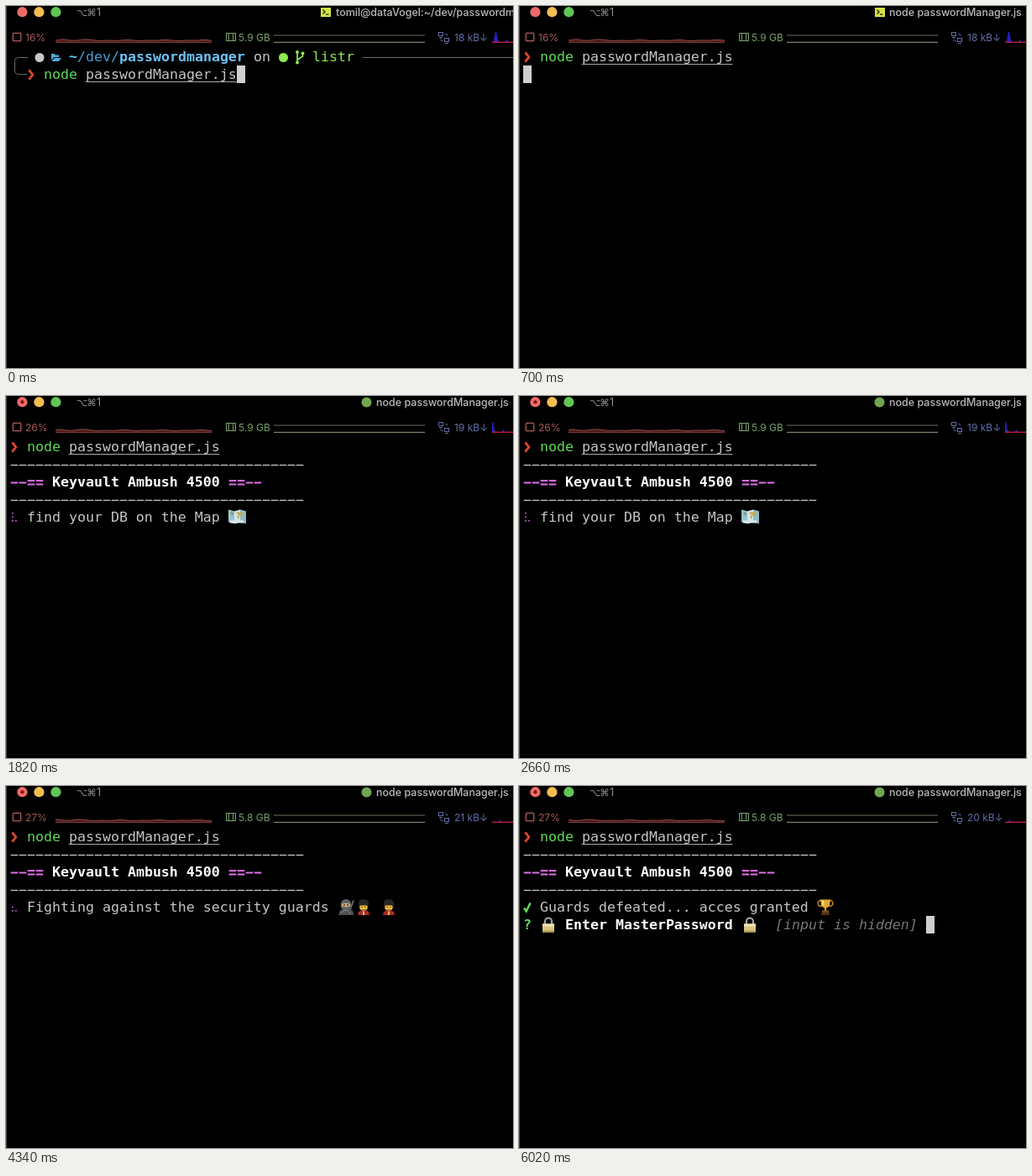
These frames come from a looping animation (604 by 432 pixels, 6370 ms). An HTML page with a canvas:

```html
<!DOCTYPE html>
<html lang="en">
<head>
<meta charset="utf-8">
<title>Terminal session</title>
<style>
  html, body { margin: 0; width: 100%; height: 100%; overflow: hidden; background: #000; }
  canvas { display: block; width: 604px; height: 432px; }
</style>
</head>
<body>
<canvas id="stage" width="604" height="432"></canvas>
<script>
const ctx = document.getElementById('stage').getContext('2d');
const LOOP = 6370, TICK = 70;
const CELL = 10, LINE = 21, LEFT = 5, TOP = 50;
const MONO = '16.6px "DejaVu Sans Mono", monospace';
const UI = 'Inter, sans-serif';
const GREEN = '#5fd95a', LIGHT = '#c6c6c6', PINK = '#e070e8', WHITE = '#ffffff';

// Moments of the session, in ms
const ENTER = 630, TITLE = 700, BANNER = 1120, SPIN = 1260, DONE = 5460;
const METER_START = 770, METER_STEP = 1022;

const METERS = [
  ['16%', '5.9 GB', '18 kB↓'],
  ['21%', '5.9 GB', '20 kB↓'],
  ['26%', '5.9 GB', '19 kB↓'],
  ['27%', '5.9 GB', '21 kB↓'],
  ['27%', '5.8 GB', '21 kB↓'],
  ['27%', '5.8 GB', '49 kB↓'],
  ['27%', '5.8 GB', '20 kB↓']
];

const TASKS = [
  { from: SPIN, color: '#b44fc0', text: 'find your DB on the Map', art: [[map, 265]] },
  { from: 2730, color: GREEN, text: 'running through the forest', art: [[tree, 305], [deer, 325], [tree, 345]] },
  { from: 4060, color: '#b44fc0', text: 'Fighting against the security guards', art: [[ninja, 395], [guard, 416], [guard, 446]] }
];

// Dots as bits: left column 1 2 4, right column 8 16 32
const SPINNER = [11, 25, 57, 56, 60, 52, 38, 39, 7, 15];

function write(str, x, y, font, color) {
  ctx.font = font;
  ctx.fillStyle = color;
  ctx.fillText(str, x, y);
}

function cells(str, col, row, color, style = '') {
  write(str, LEFT + col * CELL, TOP + row * LINE + 16, style + ' ' + MONO, color);
}

function box(x, y, w, h, color) {
  ctx.fillStyle = color;
  ctx.fillRect(x, y, w, h);
}

function disc(x, y, r, color, ry = r) {
  ctx.fillStyle = color;
  ctx.beginPath();
  ctx.ellipse(x, y, r, ry, 0, 0, 2 * Math.PI);
  ctx.fill();
}

function trace(points) {
  ctx.beginPath();
  points.forEach(([x, y]) => ctx.lineTo(x, y));
}

function line(points, color, width = 1) {
  trace(points);
  ctx.strokeStyle = color;
  ctx.lineWidth = width;
  ctx.stroke();
}

function fill(points, color) {
  trace(points);
  ctx.fillStyle = color;
  ctx.fill();
}

function frame(x, y, w, h, color) {
  ctx.strokeStyle = color;
  ctx.lineWidth = 1;
  ctx.strokeRect(x, y, w, h);
}

// Little pictures, drawn in a 20 by 20 cell
function map() {
  const sheet = ['#9cc4cc', '#d3e5e6', '#8fb9c4'];
  sheet.forEach((c, i) => {
    const x = i * 7, a = i % 2 ? 3 : 1, b = i % 2 ? 1 : 3;
    fill([[x, a], [x + 7, b], [x + 7, 15 + b], [x, 15 + a]], c);
  });
  fill([[2, 4], [6, 4], [6, 7], [4, 9]], '#7f9f93');
  fill([[9, 4], [16, 4], [17, 8], [14, 9], [11, 7]], '#c5aa55');
  fill([[10, 8], [13, 9], [12, 13]], '#a9a56c');
  box(2, 14, 16, 3, '#dcebec');
}

function tree() {
  fill([[8.5, 11], [11.5, 11], [12.5, 19.5], [7.5, 19.5]], '#82593a');
  disc(6, 9, 5, '#4c8a2b');
  disc(14, 9, 5, '#437f27');
  disc(10, 6.5, 6, '#67a63c');
  disc(10, 11.5, 6, '#4c8a2b', 4);
  disc(7.5, 6, 2.5, '#82bd50');
  disc(13, 9, 2, '#70ad42');
}

function deer() {
  const fur = '#a4703f', dark = '#6d4727';
  line([[5, 6], [3, 3], [3, 1]], dark);
  line([[6, 6], [8, 3], [8, 1]], dark);
  line([[3, 3], [1, 2]], dark);
  line([[8, 3], [10, 2]], dark);
  disc(12, 11, 5.5, fur, 3.2);
  fill([[4, 5], [7, 5], [10, 10], [8, 13], [5, 9], [1, 9], [1, 7.5]], fur);
  [[8, 7], [10, 11], [15, 16], [17, 18]].forEach(([a, b]) => line([[a, 12], [b, 19]], dark, 1.4));
  line([[17, 10], [19, 9]], fur, 2);
}

function ninja() {
  fill([[1, 19.5], [3, 14], [7, 12], [14, 12], [18, 14], [19.5, 19.5]], '#4c5053');
  line([[15, 13], [19, 2]], '#777c80', 1.6);
  disc(10, 7.5, 6.5, '#5d6164', 7);
  disc(10, 7.5, 5, '#d9b07a', 2.3);
  disc(8, 7.5, 0.9, '#222');
  disc(12, 7.5, 0.9, '#222');
  line([[4, 17], [10, 13], [16, 18]], '#85898c');
}

function guard() {
  fill([[3, 19.5], [4, 15.5], [8, 14], [12, 14], [16, 15.5], [17, 19.5]], '#b3282c');
  disc(10, 10, 4.8, '#f0bd3e', 5);
  fill([[4, 9], [4, 4], [6.5, 1], [13.5, 1], [16, 4], [16, 9], [13, 8], [7, 8]], '#2c2525');
  disc(8.2, 10, 0.7, '#3a2817');
  disc(11.8, 10, 0.7, '#3a2817');
  line([[7, 13.5], [13, 13.5]], '#5b3720');
  box(9, 15.5, 2, 4, '#e9c453');
}

function trophy() {
  const gold = '#e0a92f';
  ctx.strokeStyle = '#c48d24';
  ctx.lineWidth = 1.5;
  [4.5, 15.5].forEach(x => {
    ctx.beginPath();
    ctx.ellipse(x, 5.5, 3.3, 3.5, 0, 0, 7);
    ctx.stroke();
  });
  fill([[4, 1], [16, 1], [15, 8], [12, 11], [8, 11], [5, 8]], gold);
  fill([[6, 2], [8, 2], [8.5, 8.5], [6.5, 7]], '#ffe58c');
  box(9, 10, 2, 5, gold);
  box(6, 14, 8, 3, '#7b4e27');
  box(5, 17, 10, 2.5, '#54321a');
}

function lock() {
  ctx.strokeStyle = '#a0a4a8';
  ctx.lineWidth = 2.2;
  ctx.beginPath();
  ctx.moveTo(6, 10);
  ctx.lineTo(6, 6);
  ctx.arc(10, 6, 4, Math.PI, 0);
  ctx.lineTo(14, 10);
  ctx.stroke();
  box(3, 9, 14, 10, '#d9c580');
  box(3, 9, 14, 3, '#f1e5b5');
  box(3, 17, 14, 2, '#b89f58');
}

function place(art, x, row) {
  ctx.save();
  ctx.translate(x, TOP + row * LINE + 0.5);
  art();
  ctx.restore();
}

function titleBar(t) {
  const running = t >= SPIN;
  ['#ec6b69', '#f5bd4f', '#61c554'].forEach((c, i) => disc(19.4 + 20 * i, 7.2, 6.1, c));
  if (running) disc(19.4, 7.2, 2.1, '#7c1711');

  const gray = '#929292';
  ctx.textAlign = 'center';
  write('⌥', 91, 12, '11.5px "DejaVu Sans", sans-serif', gray);
  write('⌘', 102, 12, '11.5px "DejaVu Sans", sans-serif', gray);
  write('1', 110.5, 12, '12.5px ' + UI, gray);
  ctx.textAlign = 'left';

  const early = t < TITLE;
  const x = early ? 375 : 424;
  if (running) {
    disc(429.5, 7.5, 6, '#6fa650');
  } else {
    box(x, 2, 12, 11, '#d2e344');
    line([[x + 2.5, 4.5], [x + 5, 7], [x + 2.5, 9.5]], '#20240a', 1.3);
    line([[x + 6, 10], [x + 9.5, 10]], '#20240a', 1.3);
  }
  const title = early ? 'tomil@dataVogel:~/dev/passwordmanager' : 'node passwordManager.js';
  write(title, early ? 393 : 441, 12, '500 12.5px ' + UI, '#b9b9b9');
}

function meters(t) {
  const n = t < METER_START ? 0 : 1 + Math.floor((t - METER_START) / METER_STEP);
  const [cpu, mem, net] = METERS[Math.min(n, METERS.length - 1)];
  const red = '#a65a56', green = '#76a069', blue = '#616fa8';
  const font = '12px ' + UI;

  frame(8.5, 32.5, 9, 9, red);
  for (let i = 0; i < 4; i++) {
    const p = 9.5 + i * 2.2, dim = '#6a3936';
    box(p, 30.5, 1, 1.5, dim);
    box(p, 42, 1, 1.5, dim);
    box(6.5, p + 24, 1.5, 1, dim);
    box(18, p + 24, 1.5, 1, dim);
  }
  write(cpu, 23, 41.5, font, red);

  // Load history: an outline over a dim filled strip
  const wave = [];
  for (let x = 59; x <= 245; x += 2) {
    const u = x + n * 2;
    const bump = 1.4 * Math.exp(-(((u - 68) / 5) ** 2)) + 0.9 * Math.exp(-(((u - 91) / 7) ** 2));
    wave.push([x, 41 - bump - 0.35 * Math.sin(u / 7) - 0.3 * Math.sin(u / 3.7)]);
  }
  fill([...wave, [245, 43.5], [59, 43.5]], '#4a1a1a');
  line(wave, '#8f4a48');
  line([[59, 43.5], [245, 43.5]], '#7a3836');

  frame(262.5, 32.5, 11, 9, green);
  [265, 270].forEach(x => box(x, 33, 1, 9, green));
  write(mem, 277, 41.5, font, green);
  line([[319, 35], [499, 35]], '#66765d', 1.2);
  line([[319, 43.3], [499, 43.3]], '#74856a', 1.2);

  frame(515.5, 31.5, 5, 4, blue);
  frame(522.5, 38.5, 5, 4, blue);
  line([[518, 38], [518, 41.5], [521, 41.5]], '#454f7c');
  line([[523, 33.5], [525.5, 33.5], [525.5, 36]], '#454f7c');
  box(516, 37, 4, 1, blue);
  box(523, 44, 4, 1, blue);
  write(net, 534, 41.5, font, blue);

  // Traffic history moves two pixels left per reading
  ctx.save();
  ctx.beginPath();
  ctx.rect(579, 28, 25, 17);
  ctx.clip();
  const s = 583.8 - 2 * n, b = 596.5 - 2 * n;
  fill([[s - 3, 43], [s - 1, 31], [s + 0.5, 31], [s + 2, 40], [s + 4, 43]], '#2222c0');
  fill([[b - 2, 43], [b, 40], [b + 2, 43]], '#2424b4');
  box(579, 42.5, 25, 1.5, '#b01c3c');
  ctx.restore();
}

function arrow(col, row) {
  const x = LEFT + col * CELL, y = TOP + row * LINE;
  line([[x + 2.4, y + 5.3], [x + 6.8, y + 11], [x + 2.4, y + 16.7]], '#e0452f', 2.8);
}

function command(col, row) {
  arrow(col, row);
  cells('node', col + 2, row, GREEN);
  cells('passwordManager.js', col + 7, row, LIGHT);
  box(LEFT + (col + 7) * CELL - 0.5, TOP + row * LINE + 19, 180, 1, '#a9a9a9');
}

function cursor(col, row) {
  box(LEFT + col * CELL, TOP + row * LINE, CELL, LINE, '#cfcfcf');
}

function prompt() {
  const rule = '#686868', git = '#8cea50';
  ctx.strokeStyle = rule;
  ctx.lineWidth = 1;
  ctx.beginPath();
  ctx.moveTo(26, 61.5);
  ctx.arcTo(10.5, 61.5, 10.5, 70, 4);
  ctx.arcTo(10.5, 81.5, 24, 81.5, 4);
  ctx.lineTo(25, 81.5);
  ctx.stroke();
  box(425, 61, 179, 1, rule);

  disc(40, 61.5, 5.5, '#c9c9c9');
  fill([[54, 57], [58, 57], [59, 58.5], [63, 58.5], [63, 61], [57, 61], [54, 65]], '#4fa9da');
  fill([[57.5, 62], [66, 62], [63, 66], [54.5, 66]], '#4fa9da');
  cells('~', 7, 0, '#62c8f5', 'bold');
  cells('/dev/', 8, 0, '#459fd2');
  cells('passwordmanager', 13, 0, '#6cc2f6', 'bold');
  cells('on', 29, 0, LIGHT);
  disc(330.5, 61.5, 5.5, git);

  line([[347, 56], [347, 67]], git, 1.7);
  line([[353.5, 57], [353.5, 60], [347.5, 64]], git, 1.7);
  [[347, 55], [347, 67.5], [353.5, 56.5]].forEach(([x, y]) => disc(x, y, 2, git));
  cells('listr', 36, 0, git);
  command(2, 1);
  cursor(27, 1);
}

// Hyphens and equals signs nearly as wide as their cell
function strokes(str, col, row, color, weight) {
  [...str].forEach((ch, i) => {
    const x = LEFT + (col + i) * CELL + 0.7, y = TOP + row * LINE + 11.3;
    const offsets = ch === '=' ? [-2.2, 2.2] : [0.2];
    offsets.forEach(d => box(x, y + d - weight / 2, CELL - 1.4, weight, color));
  });
}

function banner() {
  const dashes = '-'.repeat(35);
  strokes(dashes, 0, 1, LIGHT, 1.3);
  strokes('--==', 0, 2, PINK, 2);
  cells('Keyvault Ambush 4500', 5, 2, WHITE, 'bold');
  strokes('==--', 26, 2, PINK, 2);
  strokes(dashes, 0, 3, LIGHT, 1.3);
}

function task(t) {
  const { color, text, art } = TASKS.filter(k => t >= k.from).pop();
  const step = Math.floor(17.3 + (t - 2660) / 89);
  const bits = SPINNER[step % SPINNER.length];
  for (let i = 0; i < 6; i++) {
    if (bits >> i & 1) box(i < 3 ? 7 : 11, 139 + (i % 3) * 4.5, 1.8, 1.8, color);
  }
  cells(text, 2, 4, LIGHT);
  art.forEach(([draw, x]) => place(draw, x, 4));
}

function granted() {
  line([[6, 145.5], [8.7, 149.5], [13.5, 139.5]], GREEN, 2.5);
  cells('Guards defeated... acces granted', 2, 4, LIGHT);
  place(trophy, 355, 4);
  cells('?', 0, 5, GREEN, 'bold');
  place(lock, 25, 5);
  cells('Enter MasterPassword', 5, 5, WHITE, 'bold');
  place(lock, 265, 5);
  cells('[input is hidden]', 30, 5, '#777777', 'italic');
  cursor(48, 5);
}

function terminal(t) {
  if (t < ENTER) return prompt();
  command(0, 0);
  if (t < BANNER) return cursor(0, 1);
  banner();
  if (t < SPIN) cursor(0, 4);
  else if (t < DONE) task(t);
  else granted();
}

function draw(now) {
  const t = Math.floor(now % LOOP / TICK) * TICK;
  box(0, 0, 604, 432, '#000');
  box(0, 0, 1, 432, '#4a4a4a');
  titleBar(t);
  meters(t);
  terminal(t);
}

const start = performance.now();
function loop() {
  draw(performance.now() - start);
  requestAnimationFrame(loop);
}
loop();
</script>
</body>
</html>
```
